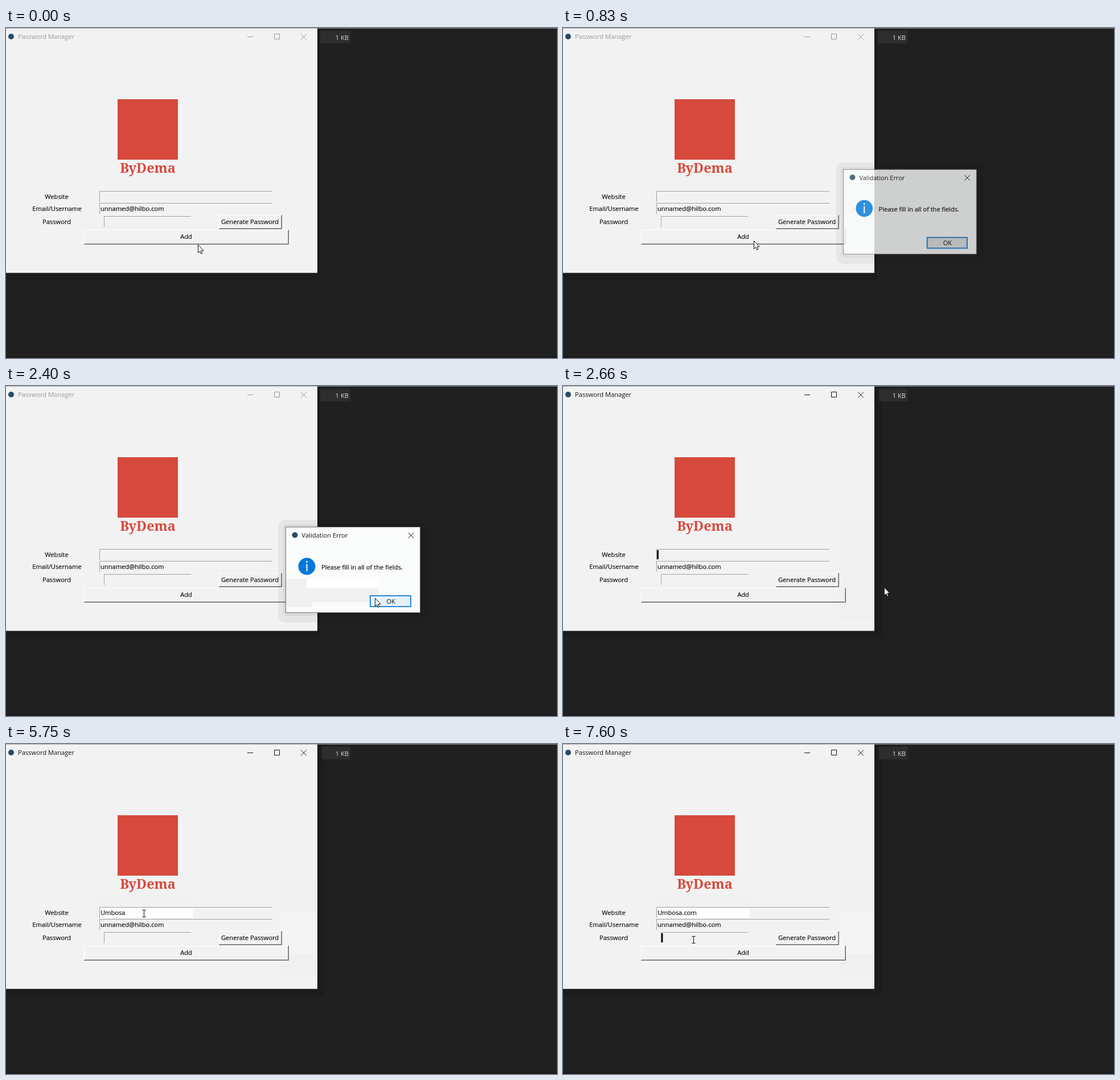
Write an HTML page that moves like this. It is 968 px wide and 579 px high and loops after 8 s.

```html
<!DOCTYPE html>
<html lang="en">
<head>
<meta charset="utf-8">
<title>Password Manager</title>
<style>
  html, body { margin: 0; width: 100%; height: 100%; overflow: hidden; background: #202020; }
  svg { display: block; width: 968px; height: 579px; }
  text { font: 11.15px "Open Sans", "Noto Sans", sans-serif; fill: #111; }
  .mid { text-anchor: middle; }
  .form text { stroke: #111; stroke-width: .2px; }
  .brand { font: 900 23.5px "Noto Serif", serif; fill: #d6493c; }
  .line { fill: none; stroke: #a0a0a0; }
  .glyph { fill: none; stroke: #111; }
  .inactive text { fill: #999; }
  .inactive .glyph { stroke: #999; }
  .light { fill: none; stroke: #fff; }
  .inner { fill: none; stroke: #a0a0a0; }
  .outer { fill: none; stroke: #696969; }
  .pressed .light { stroke: #696969; }
  .pressed .inner, .pressed .outer { stroke: #fff; }
  .pressed text { transform: translate(1px, 1px); }
</style>
</head>
<body>
<svg viewBox="0 0 968 579">
  <rect width="968" height="579" fill="#202020"/>
  <path d="M547 .5H968" stroke="#858585"/>
  <rect y="576" width="968" height="3" fill="#1e1a1b"/>
  <rect id="shadow" y="1" height="440" fill="#1c1c1c"/>
  <rect id="size" y="5" height="22" fill="#2d2d2d"/>
  <text x="602" y="21" text-anchor="end" style="fill:#ddd">1 KB</text>

  <rect width="547" height="430" fill="#f2f2f2"/>
  <path d="M0 .5H547M0 429.500H547" stroke="#a8a8a8"/>
  <g id="titleBar">
    <circle cx="9" cy="15" r="5" fill="#274a68"/>
    <text x="21" y="19">Password Manager</text>
    <path class="glyph" d="M424 15.500H434M471.500 10.500H480.500V19.500H471.500ZM518 10.500L528 20.500M528 10.500L518 20.500"/>
  </g>

  <rect x="196" y="125" width="106" height="106" fill="#d6493c"/>
  <text class="brand mid" x="249" y="254">ByDema</text>

  <rect id="tint" x="484" y="238" width="63" height="172" fill="#f0f0f0"/>
  <rect id="tintGap" x="484" y="294" width="63" height="74" fill="#f4f4f4"/>
  <g id="fieldLight">
    <rect x="164" y="262" width="164" height="25" fill="#f1f1f1"/>
    <rect x="164" y="287" width="164" height="18" fill="#fff"/>
  </g>

  <g class="form">
    <text class="mid" x="89" y="300">Website</text>
    <text class="mid" x="89.500" y="321">Email/Username</text>
    <text class="mid" x="89" y="344">Password</text>
    <path class="line" d="M468 286.500H164.500V305M468 307.500H164.500V326M325 330.500H172.500V349"/>
    <text id="site" x="166" y="300"></text>
    <text x="166" y="321">unnamed@hilbo.com</text>
    <g>
      <path class="light" d="M374.500 353V328.500H484"/>
      <path class="inner" d="M375 351.500H483.500V329"/>
      <path class="outer" d="M374 352.500H484.500V328"/>
      <text class="mid" x="428.500" y="344">Generate Password</text>
    </g>
    <g id="add">
      <path class="light" d="M137.500 379V354.500H496"/>
      <path class="inner" d="M138 378.500H495.500V355"/>
      <path class="outer" d="M137 379.500H496.500V354"/>
      <text class="mid" x="316.500" y="370">Add</text>
    </g>
  </g>
  <rect id="caret" width="3" height="16" fill="#111"/>

  <g id="dialog">
    <rect x="478" y="235" width="262" height="180" rx="13" fill="#000" opacity=".055"/>
    <rect x="487" y="243" width="245" height="160" rx="6" fill="#000" opacity=".06"/>
    <rect x="491.500" y="247.500" width="236" height="150" fill="#fafcfc" stroke="#777"/>
    <rect id="patchLeft" x="492" y="338" width="46" height="50" fill="#f0f0f0"/>
    <g id="patchRight">
      <rect x="528" y="338" width="127" height="17" fill="#fff"/>
      <rect x="528" y="355" width="127" height="24" fill="#f0f0f0"/>
    </g>
    <circle cx="507.500" cy="261.500" r="5" fill="#274a68"/>
    <text x="519.500" y="266">Validation Error</text>
    <path class="glyph" d="M706.500 257.500L716 267M716 257.500L706.500 267"/>
    <circle cx="528.500" cy="316.500" r="15" fill="#0078d7"/>
    <path d="M528.500 312.500V325" stroke="#fff" stroke-width="2"/>
    <circle cx="528.500" cy="308.500" r="1.500" fill="#fff"/>
    <g class="form"><text x="554" y="321.500">Please fill in all of the fields.</text></g>
    <rect id="ok" x="640" y="368" width="71" height="19" stroke="#2b86d6" stroke-width="2"/>
    <text class="mid" x="676" y="381.500">OK</text>
  </g>

  <g id="pointer">
    <path id="arrow" d="M.5 .5V14.500L3.700 11.500L5.800 16.200L7.900 15.300L5.800 10.700H10.100Z" fill="#fff" stroke="#111"/>
    <path id="beam" class="glyph" d="M-2.500 -5.500H3.500M.5 -5.500V6.500M-2.500 6.500H3.500"/>
  </g>
</svg>
<script>
  const LOOP = 8000;
  const SITE = "Umbosa.com";
  const $ = id => document.getElementById(id);

  // Each entry: [start time, values...]; a value holds until the next entry.
  const pointerSteps = [
    [0, 337, 380], [120, 335, 373], [1270, 527, 338], [1390, 644, 364],
    [1540, 648, 365], [1810, 648, 372], [2540, 640, 368], [2660, 564, 353],
    [2780, 324, 298, "beam"], [2900, 248, 262], [3050, 250, 294, "beam"],
    [3170, 244, 297, "beam"], [3290, 242, 297, "beam"], [7090, 240, 307, "beam"],
    [7210, 233, 331, "beam"], [7330, 229, 343, "beam"]
  ];
  const dialogSteps = [
    [0, 0, 1], [700, .4, .97], [830, .8, .99], [980, 1, 1], [2540, .4, .96], [2660, 0, 1]
  ];
  const okSteps = [
    [0, "#e1e1e1"], [1540, "#e1e8f0"], [1660, "#e5f1fb"], [2280, "#cce4f7"], [2400, "#e5f1fb"]
  ];
  const caretSteps = [
    [0, ""], [2660, "site"], [2900, ""], [3290, "site"], [3980, ""],
    [4130, "site"], [4280, ""], [4560, "site"], [4830, ""], [4980, "site"],
    [5750, ""], [5870, "site"], [6560, ""], [6940, "site"], [7480, ""], [7600, "password"]
  ];
  const keyTimes = [4130, 4560, 4680, 4980, 5110, 5230, 5870, 6120, 6270, 6420];

  const at = (steps, t) => steps.findLast(step => step[0] <= t).slice(1);
  const show = (id, on) => { $(id).style.display = on ? "" : "none"; };
  const set = (id, attributes) => {
    for (const [name, value] of Object.entries(attributes)) $(id).setAttribute(name, value);
  };

  function drawWindow(t) {
    const pressed = t >= 400 && t < 700;
    const focused = t >= 2660;
    set("titleBar", { class: pressed || t >= 2540 ? "" : "inactive" });
    set("add", { class: pressed ? "pressed" : "" });
    set("shadow", { width: focused ? 560 : 552 });
    set("size", focused ? { x: 555, width: 50 } : { x: 552, width: 53 });
    show("tint", focused);
    show("tintGap", t >= 2780);
    show("fieldLight", t >= 2900);
  }

  function drawDialog(t) {
    const [opacity, scale] = at(dialogSteps, t);
    const transform = `translate(609 322) scale(${scale}) translate(-609 -322)`;
    show("dialog", opacity > 0);
    set("dialog", { opacity, transform });
    show("patchLeft", t >= 1270);
    show("patchRight", t >= 1390);
    set("ok", { fill: at(okSteps, t)[0] });
  }

  function drawTyping(t) {
    $("site").textContent = SITE.slice(0, keyTimes.filter(key => key <= t).length);
    const [field] = at(caretSteps, t);
    show("caret", field);
    set("caret", field === "password"
      ? { x: 172.5, y: 332 }
      : { x: Math.round(165 + $("site").getComputedTextLength()), y: 288 });
  }

  function drawPointer(t) {
    const [x, y, shape] = at(pointerSteps, t);
    set("pointer", { transform: `translate(${x} ${y})` });
    show("arrow", !shape);
    show("beam", shape);
  }

  function draw(t) {
    drawWindow(t);
    drawDialog(t);
    drawTyping(t);
    drawPointer(t);
  }

  const start = performance.now();
  function tick() {
    draw((performance.now() - start) % LOOP);
    requestAnimationFrame(tick);
  }
  draw(0);
  requestAnimationFrame(tick);
</script>
</body>
</html>
```
